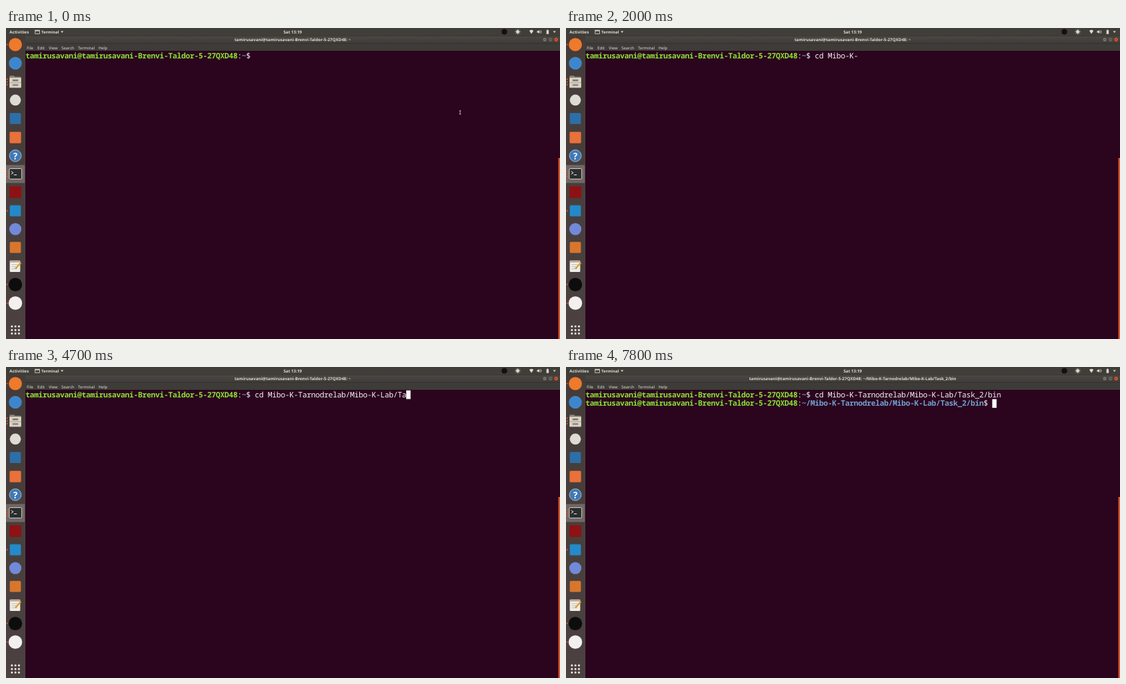
Write an HTML page that moves like this. It is 800 px wide and 450 px high and loops after 8000 ms.

```html
<!DOCTYPE html>
<html lang="en">
<head>
<meta charset="utf-8">
<title>Terminal session</title>
<style>
  html, body { margin: 0; width: 100%; height: 100%; overflow: hidden; background: #2b041e; }
  svg { display: block; width: 800px; height: 450px; }
  text { white-space: pre; text-rendering: geometricPrecision; fill: #dfdbd2; }
  .bar { font: bold 6px "Noto Sans", sans-serif; }
  .menu { font: 5.9px "Noto Sans", sans-serif; }
  .term text { font: 11px "Noto Sans Mono", monospace; letter-spacing: -.35px; fill: #f4f2f3; }
  .term .user { font-weight: bold; fill: #8ae234; }
  .term .path { font-weight: bold; fill: #729fcf; }
</style>
</head>
<body>
<svg viewBox="0 0 800 450">
  <defs>
    <linearGradient id="titleFill" x2="0" y2="1">
      <stop stop-color="#4a4842"/><stop offset="1" stop-color="#3d3c38"/>
    </linearGradient>
    <linearGradient id="dockFill" x2="0" y2="1">
      <stop stop-color="#443c39"/><stop offset="1" stop-color="#4b4140"/>
    </linearGradient>
  </defs>
  <rect width="800" height="450" fill="#2b041e"/>
  <rect width="800" height="11.5" fill="#403e39"/>
  <rect y="11.5" width="800" height="11" fill="url(#titleFill)"/>
  <rect y="22.5" width="800" height="10.5" fill="#3d3c38"/>
  <rect y="11.5" width="28" height="438.5" fill="url(#dockFill)"/>
  <rect x="797.6" y="188" width="2.4" height="262" fill="#d5562f"/>

  <g class="bar">
    <text x="5" y="7.8">Activities</text>
    <text x="51" y="7.8" font-size="5.8">Terminal</text>
    <text x="414" y="7.8" text-anchor="middle">Sat 13:19</text>
    <text id="title" x="414" y="19.1" text-anchor="middle"></text>
  </g>
  <g class="menu">
    <text x="30" y="30.6">File</text><text x="45.3" y="30.6">Edit</text>
    <text x="61.7" y="30.6">View</text><text x="80" y="30.6">Search</text>
    <text x="104" y="30.6">Terminal</text><text x="133.5" y="30.6">Help</text>
  </g>

  <!-- panel indicators -->
  <g fill="none" stroke="#dfdbd2" stroke-width=".8">
    <rect x="42" y="3.2" width="6.5" height="5"/>
    <path d="M42 4h6.5" stroke-width="1.3"/>
    <path d="M739 1.5v8M735 5.5h8M736.2 2.7l5.6 5.6M741.8 2.7l-5.6 5.6"/>
    <path d="M770.5 4.2q1.2 1.3 0 2.6M772 3.2q2 2.3 0 4.6"/>
  </g>
  <g fill="#dfdbd2">
    <circle cx="739" cy="5.5" r="2.2"/>
    <path d="M79 4.5h4l-2 2.6zM790 4.5h4l-2 2.6zM755.7 4q3-2.4 6 0l-3 4.6z"/>
    <path d="M766.7 4.6h1.3l1.9-1.7v5.2L768 6.4h-1.3zM780.5 3.2h.8v-.8h1.6v.8h.8v5.6h-3.2z"/>
  </g>
  <circle cx="719.7" cy="5.5" r="4" fill="#170e0e"/>

  <!-- window buttons -->
  <g stroke="#2f2e2a" stroke-width=".5">
    <circle cx="778" cy="16.8" r="3" fill="#7d7a71"/>
    <circle cx="786.2" cy="16.8" r="3" fill="#7d7a71"/>
    <circle cx="794.4" cy="16.8" r="3" fill="#e5592f"/>
  </g>
  <path d="M776.6 16.8h2.8M785 15.7h2.4v2.2H785zM793.3 15.7l2.2 2.2M795.5 15.7l-2.2 2.2" fill="none" stroke="#35342f" stroke-width=".7"/>

  <!-- dock -->
  <rect y="198.3" width="27" height="26" fill="#706765"/>
  <g id="dock"></g>
  <g>
    <path d="M5 70.5q0-1.5 1.5-1.5h5l1.5 1.5h7.500q1.500 0 1.500 1.500v14H5z" fill="#8d8479"/>
    <rect x="5" y="72" width="17" height="14.500" rx="1" fill="#d8d2c5"/>
    <path d="M5 79h17" stroke="#a39b8d" stroke-width=".8"/>
    <rect x="9.500" y="74.500" width="8" height="2.500" fill="#81786d"/>
    <rect x="9.500" y="81.500" width="8" height="2" fill="#81786d"/>
  </g>
  <circle cx="13.500" cy="184.800" r="8.500" fill="#4179b5" stroke="#a9c6e6" stroke-width=".9"/>
  <text x="13.500" y="189.700" text-anchor="middle" style="font:bold 13px 'Noto Sans',sans-serif;fill:#fff">?</text>
  <rect x="4.700" y="203.500" width="18" height="15" rx="1.500" fill="#2b2e2d" stroke="#c9c8c3"/>
  <path d="M7.500 207.500l3 2-3 2M11.500 212.500h4" fill="none" stroke="#f1f1ef"/>
  <rect x="5.500" y="336.500" width="15" height="16.500" rx="1" fill="#f0eee8"/>
  <path d="M5.500 338.200h15" stroke="#b9a58d" stroke-width="2"/>
  <path d="M8 342.500h9M8 345.500h7M8 348.500h8" stroke="#b7b5b0" stroke-width=".8"/>
  <path d="M13.500 348.500l8-9" stroke="#e39a36" stroke-width="2.200"/>
  <g id="apps" fill="#efeceb"></g>
  <g id="running" fill="#e2502c"></g>

  <g class="term">
    <text x="28" y="43.600"><tspan class="user"></tspan>:<tspan class="path">~</tspan>$ <tspan id="typed"></tspan></text>
    <text id="nextLine" x="28" y="56.300"><tspan class="user"></tspan>:<tspan class="path" id="cwd"></tspan>$</text>
    <rect id="cursor" width="6.250" height="12.600" fill="#fff"/>
  </g>
  <path id="pointer" d="M654.500 119.800h2.600M654.500 124.600h2.600M655.800 119.800v4.800" fill="none" stroke="#d9d3d7" stroke-width=".8"/>
</svg>
<script>
const $ = id => document.getElementById(id);
const LOOP = 8000, BLINK = 300, ENTER = 7500, CELL = 6.25;
const user = 'tamirusavani@tamirusavani-Brenvi-Taldor-5-27QXD48';
const folder = 'Mibo-K-Tarnodrelab/Mibo-K-Lab/Task_2/bin';
const command = 'cd ' + folder;
const promptCols = user.length + 4;

// Key times in tenths of a second; run() covers steady typing.
const run = (from, count) => Array.from({ length: count }, (_, i) => from + i);
const keys = [2, 3, 4, 6, 7, 9, 10, 12, 15, 17, 21, 22, ...run(24, 17),
  ...run(42, 6), ...run(50, 3), 57, 62, 66, 68, 70].map(k => k * 100);

function add(parent, tag, attrs) {
  const node = document.createElementNS('http://www.w3.org/2000/svg', tag);
  for (const name in attrs) node.setAttribute(name, attrs[name]);
  $(parent).append(node);
}
const disc = (parent, cx, cy, r, fill) =>
  add(parent, 'circle', fill ? { cx, cy, r, fill } : { cx, cy, r });
const tile = (y, size, fill) =>
  add('dock', 'rect', { x: 13.5 - size / 2, y: y - size / 2, width: size, height: size, rx: 1.5, fill });

for (const [y, r, fill] of [[24, 9.5, '#ee7a2b'], [51, 9.3, '#3e86cc'], [104.3, 8, '#dedbd2'],
  [291, 8.7, '#7289da'], [371.2, 9.8, '#0e0d0e'], [398, 9.8, '#f3f0ef']]) disc('dock', 13.5, y, r, fill);
for (const [y, size, fill] of [[131, 16, '#2c6fa6'], [158.5, 16.5, '#e9713a'], [237.5, 17, '#8e1113'],
  [264.5, 16, '#2489ca'], [317.5, 16, '#d9762c']]) tile(y, size, fill);
for (let i = 0; i < 9; i++) disc('apps', 8.5 + i % 3 * 5.1, 431.8 + Math.floor(i / 3) * 5.1, 1.5);
for (const y of [24, 74, 78, 82, 207, 211, 215, 264.5, 371, 398]) disc('running', 1.7, y, 1.1);

document.querySelectorAll('.user').forEach(node => node.textContent = user);
$('cwd').textContent = '~/' + folder;

const show = (id, visible) => $(id).setAttribute('visibility', visible ? 'visible' : 'hidden');

function draw() {
  const t = performance.now() % LOOP;
  const count = keys.filter(k => k <= t).length;
  const done = t >= ENTER;
  const blinkOn = count ? Math.floor((t - keys[count - 1]) / BLINK) % 2 === 0 : t >= 100;
  const column = done ? user.length + folder.length + 5 : promptCols + count;

  $('typed').textContent = command.slice(0, count);
  $('title').textContent = user + ': ~' + (done ? '/' + folder : '');
  $('cursor').setAttribute('x', 28 + column * CELL);
  $('cursor').setAttribute('y', done ? 46.5 : 33.8);
  show('cursor', done || blinkOn);
  show('nextLine', done);
  show('pointer', count === 0);
  requestAnimationFrame(draw);
}
draw();
</script>
</body>
</html>
```
